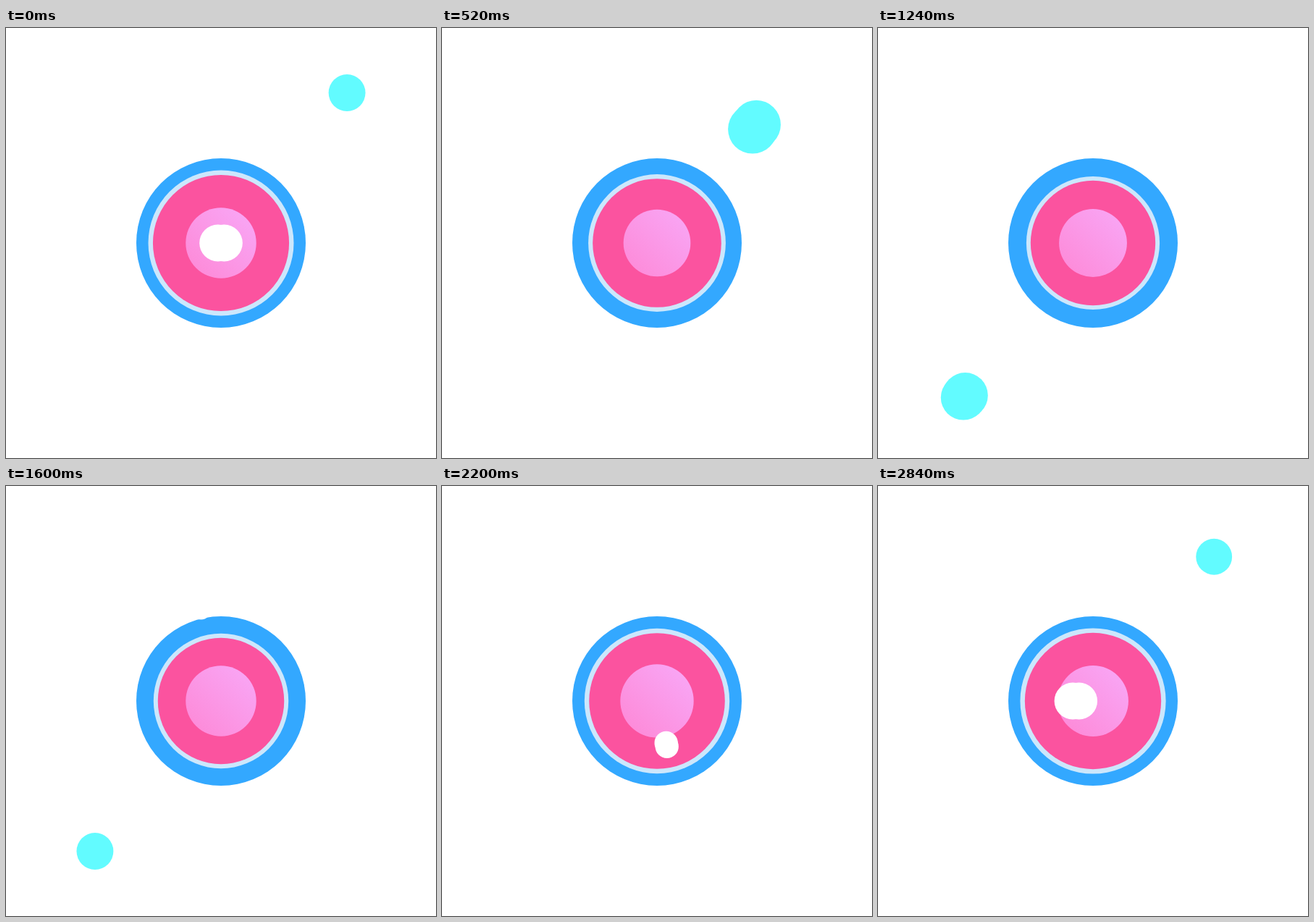
Write an HTML page with a canvas that moves like this. It is 594 px wide and 594 px high and loops after 2.88 s.

```html
<!DOCTYPE html>
<html lang="en">
<head>
<meta charset="utf-8">
<title>Orbiting balls</title>
<style>
  html, body { margin: 0; width: 100%; height: 100%; overflow: hidden; background: #fff; }
  canvas { display: block; }
</style>
</head>
<body>
<canvas id="stage" width="594" height="594"></canvas>
<script>
const ctx = document.getElementById('stage').getContext('2d');
const SIZE = 594, MID = SIZE / 2;
const LOOP = 2880, STEP = 40;
const RAD = Math.PI / 180;
const DEPTH = 0.26;   // strength of the perspective
const LAG = 0.9;      // half the gap between the two copies of a near ball, degrees

// dir: heading while passing in front; pass: time of that passage
const balls = [
  { color: '#62fbff', dir: 130, pass: 800, reach: 287.4, r: 26.6 },
  { color: '#fff', dir: 0, pass: 0, reach: 201.5, r: 18.9 },
  { color: '#fff', dir: 77.7, pass: 2039, reach: 136, r: 12.2 }
];

const coreFill = ctx.createLinearGradient(MID - 35, MID + 35, MID + 35, MID - 35);
coreFill.addColorStop(0, '#fd8cda');
coreFill.addColorStop(1, '#f9a4f3');

function disc(x, y, r, fill) {
  ctx.fillStyle = fill;
  ctx.beginPath();
  ctx.arc(x, y, r, 0, 2 * Math.PI);
  ctx.fill();
}

function phase(t, start) {
  return (t - start) / LOOP * 360;
}

function drawBall(ball, angle) {
  const scale = 1 / (1 - DEPTH * Math.cos(angle * RAD));
  const dist = ball.reach * Math.sin(angle * RAD) * scale;
  disc(MID + dist * Math.cos(ball.dir * RAD),
       MID + dist * Math.sin(ball.dir * RAD),
       ball.r * scale, ball.color);
}

function drawBalls(t, front) {
  for (const ball of balls) {
    const angle = phase(t, ball.pass);
    if ((Math.cos(angle * RAD) > 0) !== front) continue;
    const offsets = front ? [-LAG, LAG] : [0];
    offsets.forEach(o => drawBall(ball, angle + o));
  }
}

function draw(t) {
  ctx.fillStyle = '#fff';
  ctx.fillRect(0, 0, SIZE, SIZE);
  drawBalls(t, false);

  const a = phase(t, 1135) * RAD;
  const ring = 96.4 - 4.9 * Math.cos(a) + 0.6 * Math.cos(3 * a);
  const core = 48.3 - 2.4 * Math.cos(phase(t, 800) * RAD);
  disc(MID, MID, 117, '#33a8ff');
  disc(MID, MID, ring, '#cce7fc');
  disc(MID, MID, ring * 0.936, '#fb539f');
  disc(MID, MID, core, coreFill);

  drawBalls(t, true);
}

function tick() {
  const t = performance.now() % LOOP;
  draw(Math.floor(t / STEP) * STEP);
  requestAnimationFrame(tick);
}
tick();
</script>
</body>
</html>
```
